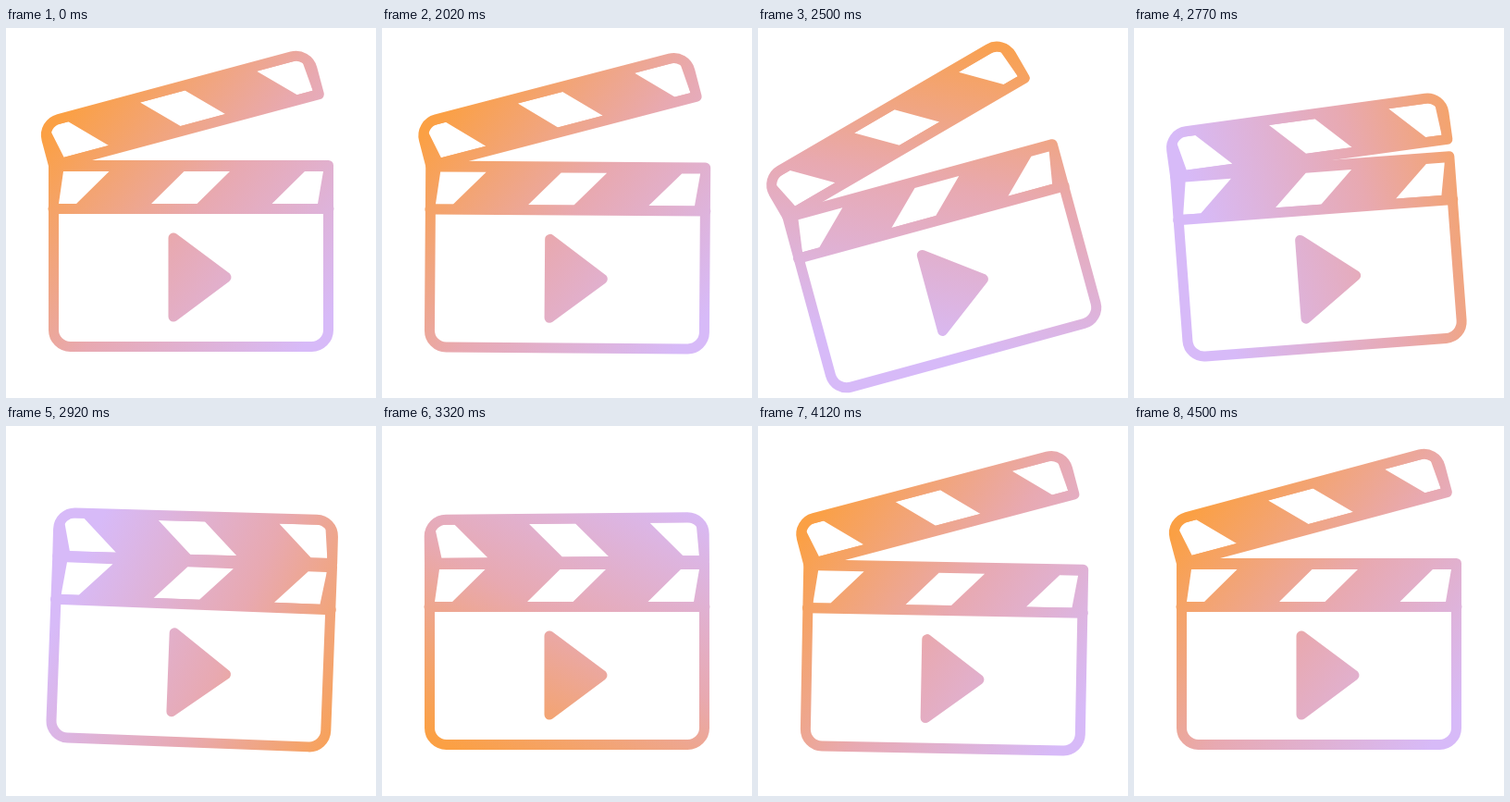
These frames come from a looping animation (400 px wide and 400 px high, 4520 ms). An HTML page with a canvas:

```html
<!DOCTYPE html>
<html lang="en">
<head>
<meta charset="utf-8">
<title>Clapperboard</title>
<style>
  html, body { margin: 0; width: 100%; height: 100%; overflow: hidden; background: #fff; }
  canvas { display: block; width: 400px; height: 400px; }
</style>
</head>
<body>
<canvas id="stage" width="400" height="400"></canvas>
<script>
const ctx = document.getElementById('stage').getContext('2d');
const LOOP = 4520, REST_END = 2020, REST_FROM = 4500;
const RAD = Math.PI / 180;
const CENTER = { x: 200, y: 246.5 };
const HINGE = { x: 51.5, y: 148.5 };
const LEFT = 51.5, RIGHT = 348.5, STROKE = 11;

const progress = (t, from, to) => Math.min(1, Math.max(0, (t - from) / (to - from)));
const smooth = p => p * p * (3 - 2 * p);
const smoother = p => p * p * p * (p * (6 * p - 15) + 10);
const ease = (t, from, to) => smooth(progress(t, from, to));
const bump = (t, from, peak, to) => ease(t, from, peak) - ease(t, peak, to);

// The board leans forward, tilts back, settles, then leans again before opening.
function boardPose(t) {
  const lean = 1.25 * bump(t, 1985, 2230, 2600) + bump(t, 3630, 3970, 4180);
  const tilt = bump(t, 2230, 2600, 2870);
  const settle = bump(t, 2600, 2870, 3070);
  return {
    turn: 5.6 * lean - 20 * tilt + 2.6 * settle,
    x: 7.2 * lean - tilt + 0.5 * settle,
    y: 20.5 * lean + 10 * tilt - 3 * settle
  };
}

// The arm slams shut, rebounds a little, then reopens past its resting angle.
function armAngle(t) {
  const rebound = Math.sin(Math.PI * progress(t, 2850, 3390)) ** 2;
  const closed = ease(t, 2600, 2850) - ease(t, 3930, 4190);
  return -15 * (1 - closed) - 3.7 * rebound - 4.2 * bump(t, 3930, 4190, 4490);
}

function gradientAt(t) {
  const angle = (40 + 360 * smoother(progress(t, 1990, 4500) ** 0.75)) * RAD;
  const offset = -55 * bump(t, 1990, 2800, 3320);
  const end = d => [200 + Math.cos(angle) * (offset + d), 210 + Math.sin(angle) * (offset + d)];
  const g = ctx.createLinearGradient(...end(-180), ...end(180));
  g.addColorStop(0, '#fba044');
  g.addColorStop(0.5, '#e8a9b1');
  g.addColorStop(1, '#d7baf8');
  return g;
}

// Slanted window between two heights, cut off at the inner side walls.
function addWindow(path, top, bottom, topLeft, width, slant) {
  const clamp = x => Math.min(RIGHT - 5.5, Math.max(LEFT + 5.5, x));
  path.moveTo(clamp(topLeft), top);
  path.lineTo(clamp(topLeft + width), top);
  path.lineTo(clamp(topLeft + width + slant), bottom);
  path.lineTo(clamp(topLeft + slant), bottom);
  path.closePath();
}

const frame = new Path2D();
frame.moveTo(LEFT, HINGE.y);
frame.lineTo(RIGHT, HINGE.y);
frame.arcTo(RIGHT, 344.5, 200, 344.5, 18);
frame.arcTo(LEFT, 344.5, LEFT, 200, 18);
frame.closePath();

const arm = new Path2D();
arm.moveTo(LEFT, HINGE.y);
arm.arcTo(LEFT, 101.5, 200, 101.5, 18);
arm.arcTo(RIGHT, 101.5, RIGHT, HINGE.y, 18);
arm.lineTo(RIGHT, HINGE.y);
arm.closePath();

const divider = new Path2D('M51 195.5H349');
const play = new Path2D('M181 227V312L238 269.5Z');

const strip = new Path2D();
strip.rect(LEFT, HINGE.y, RIGHT - LEFT, 47);
const armFill = new Path2D(arm);
for (let i = 0; i < 3; i++) {
  addWindow(strip, 155, 190, 62 + 130.5 * i, 49.5, -35.5);
  addWindow(armFill, 107, 143, 29 + 130.5 * i, 50, 35.5);
}

function rotateAbout(point, degrees) {
  ctx.translate(point.x, point.y);
  ctx.rotate(degrees * RAD);
  ctx.translate(-point.x, -point.y);
}

function drawBoard(t) {
  const { turn, x, y } = boardPose(t);
  ctx.save();
  ctx.lineWidth = STROKE;
  ctx.lineJoin = ctx.lineCap = 'round';
  ctx.translate(x, y);
  rotateAbout(CENTER, turn);
  for (const line of [frame, divider, play]) ctx.stroke(line);
  ctx.fill(strip, 'evenodd');
  ctx.fill(play);
  rotateAbout(HINGE, armAngle(t));
  ctx.stroke(arm);
  ctx.fill(armFill, 'evenodd');
  ctx.restore();
}

function paintAll(mode, style) {
  ctx.globalCompositeOperation = mode;
  ctx.fillStyle = style;
  ctx.fillRect(0, 0, 400, 400);
}

function render(now) {
  let t = now % LOOP;
  if (t < REST_END || t >= REST_FROM) t = 0;
  ctx.globalCompositeOperation = 'source-over';
  ctx.clearRect(0, 0, 400, 400);
  ctx.fillStyle = ctx.strokeStyle = '#000';
  drawBoard(t);
  paintAll('source-in', gradientAt(t));
  paintAll('destination-over', '#fff');
}

const start = performance.now();
function tick() {
  render(performance.now() - start);
  requestAnimationFrame(tick);
}
tick();
</script>
</body>
</html>
```
